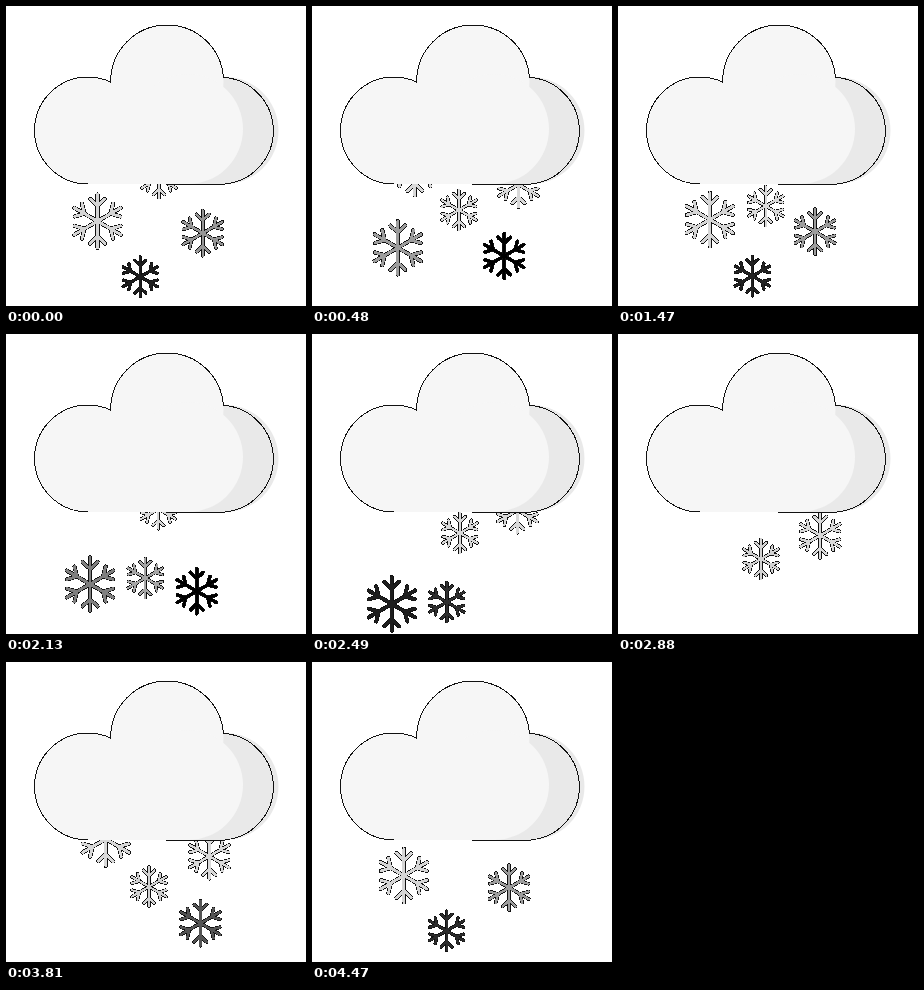
An HTML page that plays this animation: 300x300 px, repeating every 4500 ms.

```html
<!DOCTYPE html>
<html lang="en">
<head>
<meta charset="utf-8">
<title>Snow cloud</title>
<style>
  html, body { margin: 0; width: 100%; height: 100%; overflow: hidden; background: #fff; }
  svg { display: block; width: 100%; height: 100%; }
  .flake { fill: none; stroke-linecap: round; shape-rendering: crispEdges; }
  .line { fill: none; stroke: #111; shape-rendering: crispEdges; }
</style>
</head>
<body>
<svg id="stage" viewBox="0 0 300 300">
  <g id="snow"></g>
  <g id="cloud">
    <path fill="#e9e9e9" d="M161 178V71H219A53.5 53.5 0 0 1 219 178Z"/>
    <g fill="#f6f6f6">
      <circle cx="82" cy="124.5" r="53.5"/>
      <circle cx="161" cy="75.5" r="56.5"/>
      <circle cx="182" cy="123" r="55"/>
      <path d="M82 90H184V178H82Z"/>
    </g>
    <path class="line" d="M82 178A53.5 53.5 0 0 1 82 71A53.5 53.5 0 0 1 104.6 76
      A56.5 56.5 0 0 1 161 19A56.5 56.5 0 0 1 217.4 71.5H219A53.5 53.5 0 0 1 219 178"/>
    <path class="line" d="M160 178.5H219"/>
  </g>
</svg>
<script>
const LOOP = 4500;
const NS = 'http://www.w3.org/2000/svg';
const snow = document.getElementById('snow');

// r: radius; x: position at y = 200; drift: x per y; fade: y range light to black;
// path: [time, y] steps; starts: launch times
const kinds = [
  { r: 28.5, x: 94.8, drift: -.215, fade: [205, 275],
    path: [[0, 152], [570, 177], [2360, 276]], starts: [240, 3240] },
  { r: 21, x: 147.7, drift: -.19, fade: [215, 275],
    path: [[0, 172], [1530, 274]], starts: [0, 1050, 2085, 3020] },
  { r: 24, x: 202.2, drift: -.2, fade: [200, 249],
    path: [[0, 157], [2160, 260]], starts: [30, 3030] },
  { r: 24, x: 202.4, drift: -.13, fade: [208, 276],
    path: [[0, 155], [1880, 276]], starts: [2160] }
];

function flakePath(r) {
  let d = '';
  for (let i = 0; i < 6; i++) {
    const a = i * Math.PI / 3, c = Math.cos(a), s = Math.sin(a);
    const at = (x, y) => `${((x * c - y * s) * r).toFixed(2)} ${((x * s + y * c) * r).toFixed(2)}`;
    d += `M0 0L${at(0, .94)}M${at(-.26, .78)}L${at(0, .53)}L${at(.26, .78)}`;
  }
  return d;
}

function add(parent, tag, attrs) {
  const el = document.createElementNS(NS, tag);
  for (const k in attrs) el.setAttribute(k, attrs[k]);
  return parent.appendChild(el);
}

const flakes = kinds.flatMap(kind => kind.starts.map(start => {
  const g = add(snow, 'g', { class: 'flake' });
  const d = flakePath(kind.r), w = kind.r * .1;
  add(g, 'path', { d, stroke: '#111', 'stroke-width': w + 1.4 });
  const core = add(g, 'path', { d, 'stroke-width': w });
  return { kind, start, g, core };
}));

function yAt(path, t) {
  const i = path.findIndex((p, n) => n && t <= p[0]);
  if (i < 0) return null;
  const [t0, y0] = path[i - 1], [t1, y1] = path[i];
  return y0 + (y1 - y0) * (t - t0) / (t1 - t0);
}

function draw(time) {
  for (const { kind, start, g, core } of flakes) {
    const y = yAt(kind.path, (time - start + LOOP) % LOOP);
    g.style.display = y === null ? 'none' : '';
    if (y === null) continue;
    const x = kind.x + kind.drift * (y - 200);
    const [from, to] = kind.fade;
    const u = Math.min(1, Math.max(0, (y - from) / (to - from)));
    const v = Math.round(217 * (1 - u * u));
    g.setAttribute('transform', `translate(${x.toFixed(2)} ${y.toFixed(2)})`);
    core.setAttribute('stroke', `rgb(${v},${v},${v})`);
  }
}

const begin = performance.now();
function tick() {
  draw((performance.now() - begin) % LOOP);
  requestAnimationFrame(tick);
}
tick();
</script>
</body>
</html>
```
